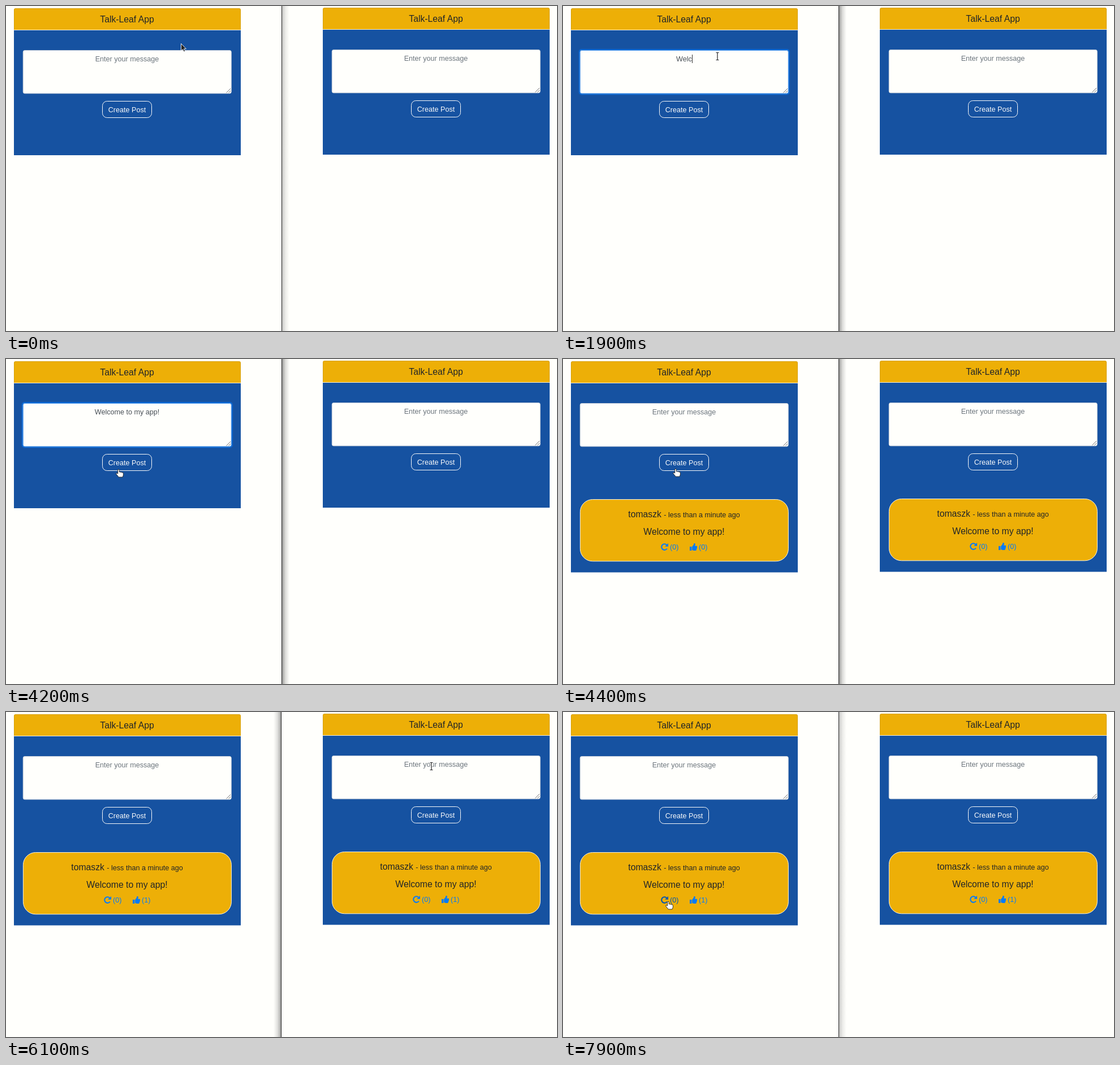
Recreate the animation shown at these times as an HTML page. Size 974 by 575 pixels, loop 8000 ms.

```html
<!DOCTYPE html>
<html lang="en">
<head>
<meta charset="utf-8">
<title>Two browser windows</title>
<style>
  html, body { margin: 0; width: 100%; height: 100%; overflow: hidden; background: #fffffc; }
  svg { display: block; width: 974px; height: 575px; }
  text { font: 12.6px "Liberation Sans", Arial, sans-serif; text-anchor: middle; white-space: pre; }
  .big { font-size: 15.75px; fill: #212529; }
  .small { font-size: 12.6px; }
  .link { fill: #007bff; color: #007bff; }
  .link text { text-anchor: start; }
  .hover { fill: #0056b3; color: #0056b3; }
</style>
</head>
<body>
<svg id="stage" viewBox="0 0 974 575"></svg>
<script>
const PAPER = '#fffffc', BLUE = '#1652a1', GOLD = '#edaf07';
const LOOP = 8000, STEP = 100;
const MESSAGE = 'Welcome to my app!';

const panel = (id, x, y) => `
<g id="${id}" transform="translate(${x} ${y})">
  <path d="M14 43V7q0-3 3-3H412q3 0 3 3V43Z" fill="${GOLD}"/>
  <path d="M14.4 43V7.4q0-3 3-3H411.6q3 0 3 3V43" fill="none" stroke="#000" stroke-opacity=".13" stroke-width=".8"/>
  <rect class="body" x="14" y="43" width="401" height="221" fill="${BLUE}"/>
  <rect x="14" y="42" width="401" height="1" fill="#f3efe0"/>
  <text class="big" x="214" y="29">Talk-Leaf App</text>
  <rect class="glow" x="27.7" y="76" width="373.1" height="81.3" rx="5" fill="#007bff" fill-opacity=".5" opacity="0"/>
  <rect x="30.2" y="78.5" width="368.1" height="76.3" rx="3" fill="${PAPER}" stroke="#ced4da" stroke-width=".8"/>
  <rect class="glow" x="30.2" y="78.5" width="368.1" height="76.3" rx="3" fill="none" stroke="#4a98ee" opacity="0"/>
  <path d="M389.5 153.5l7.5-7.5M393.5 153.5l3.5-3.5" stroke="#666" stroke-width=".9"/>
  <text class="field" x="214" y="98"></text>
  <rect class="caret" y="86" width="1" height="15" fill="#333" visibility="hidden"/>
  <rect x="170.5" y="168.5" width="87" height="29" rx="8" fill="none" stroke="#f8f9fa"/>
  <text x="214" y="187.5" fill="#f8f9fa">Create Post</text>
  <g class="post" visibility="hidden">
    <rect x="30.4" y="248.5" width="368" height="109.3" rx="22" fill="${GOLD}" stroke="#fbf4dd"/>
    <text class="big" x="214" y="280">tomaszk <tspan class="small">- less than a minute ago</tspan></text>
    <text class="big" x="214" y="310.5">${MESSAGE}</text>
    <g class="link redo">
      <path d="M183.6 329.2A5.3 5.3 0 1 0 183.9 335.5" fill="none" stroke="currentColor" stroke-width="2.1"/>
      <path d="M186 326v5.7h-5.8z"/>
      <text x="189" y="337">(0)</text>
    </g>
    <g class="link like">
      <path d="M224 332h3.4v7H224zM228.2 332.2l2.6-3.5c.6-.9.2-2.6 1.4-2.6 2.2 0 2 2.6.8 4.6h2.8c1.5 0 1.8 1.5.9 2.3.6.8.4 1.5-.3 2 .4.9 0 1.6-.6 1.9.2 1.2-.5 2.1-1.7 2.1h-2c-1.7 0-2.4-.7-3.9-1z"/>
      <text class="count" x="240" y="337">(0)</text>
    </g>
  </g>
</g>`;

const fade = (id, from, to, alpha) => `
<linearGradient id="${id}" x1="${from}" x2="${to}">
  <stop offset="0" stop-color="#333" stop-opacity="${alpha}"/>
  <stop offset=".45" stop-color="#333" stop-opacity="${alpha * .35}"/>
  <stop offset="1" stop-color="#333" stop-opacity="0"/>
</linearGradient>`;

const stage = document.getElementById('stage');
stage.innerHTML = `
<defs>${fade('soft', 0, 1, .28)}${fade('strong', 0, 1, .5)}${fade('back', 1, 0, .45)}</defs>
<rect width="974" height="575" fill="${PAPER}"/>
${panel('left', 0, 0)}${panel('right', 546, -1)}
<rect id="shade" width="13" height="575"/>
<rect id="edge" width="1" height="575" fill="#222"/>
<g id="pointer" stroke-linejoin="round">
  <path class="arrow" d="M.5 .5V13.3L3.4 10.6 5.5 15.1 7.6 14.1 5.6 9.8H9.4Z" fill="#222" stroke="#fff" stroke-width=".9"/>
  <g class="beam" fill="none">
    <path d="M-2.5-6.5H2.5M0-6.5V6.5M-2.5 6.5H2.5" stroke="#fff" stroke-width="2.6"/>
    <path d="M-2.5-6.5H2.5M0-6.5V6.5M-2.5 6.5H2.5" stroke="#222" stroke-width="1.2"/>
  </g>
  <path class="hand" d="M-1.3 8V1Q0-.7 1.3 1V5Q2.6 4.2 3.5 5.4 4.7 4.6 5.8 5.8 8.2 5.3 8.4 7.4V10Q8.2 12 7 14H.2Q-1.6 11.5-4.2 8.6-4.6 6.6-2.7 7Z" fill="#fff" stroke="#222" stroke-width=".9"/>
</g>`;

const $ = s => stage.querySelector(s);
const show = (el, on) => el.setAttribute('visibility', on ? 'visible' : 'hidden');
const lastBefore = (rows, t) => rows.filter(r => r[0] <= t).pop();

// [time, x, y, shape]
const MOVES = [
  [0, 309, 66, 'arrow'], [300, 297, 73, 'arrow'], [400, 283, 83, 'beam'], [600, 270, 76, 'beam'],
  [900, 273, 89, 'beam'], [3800, 232, 150, 'arrow'], [3900, 187, 173, 'hand'], [4100, 199, 195, 'hand'],
  [4300, 199, 194, 'hand'], [4500, 240, 206, 'arrow'], [4600, 390, 243, 'arrow'], [4700, 580, 290, 'arrow'],
  [4800, 745, 330, 'arrow'], [4900, 842, 339, 'arrow'], [5000, 826, 338, 'arrow'], [5100, 811, 335, 'arrow'],
  [5200, 802, 333, 'arrow'], [5300, 795, 331, 'hand'], [5800, 798, 280, 'arrow'], [5900, 794, 213, 'arrow'],
  [6100, 752, 96, 'beam'], [6300, 715, 108, 'beam'], [6400, 679, 121, 'beam'], [6600, 480, 215, 'arrow'],
  [6700, 260, 304, 'arrow'], [6800, 176, 324, 'hand'], [7000, 163, 345, 'arrow'], [7100, 172, 356, 'arrow'],
  [7200, 212, 354, 'arrow'], [7300, 256, 346, 'arrow'], [7400, 279, 322, 'arrow'], [7500, 266, 285, 'arrow'],
  [7600, 232, 300, 'arrow'], [7700, 201, 324, 'hand'], [7800, 186, 335, 'hand']
];

// [time, letters typed]
const KEYS = [
  [0, 0], [1400, 1], [1600, 2], [1800, 3], [1900, 4], [2100, 5], [2200, 6], [2300, 7], [2400, 8],
  [2500, 10], [2600, 11], [2800, 13], [2900, 14], [3000, 15], [3100, 16], [3300, 17], [3400, 18], [4400, 0]
];

// [time, shadow, shadow x, edge x]
const FOCUS = [
  [0, 'soft', 488, 487], [600, 'strong', 488, 487], [5500, 'back', 473, 486], [7900, 'soft', 488, 487]
];

function drawField(id, typed) {
  const field = $(`#${id} .field`);
  field.textContent = typed || 'Enter your message';
  field.setAttribute('fill', typed ? '#495057' : '#6c757d');
  return typed ? field.getComputedTextLength() : 0;
}

function drawPost(id, posted, liked) {
  show($(`#${id} .post`), posted);
  $(`#${id} .body`).setAttribute('height', posted ? 334.5 : 221);
  $(`#${id} .count`).textContent = liked ? '(1)' : '(0)';
}

function drawPointer(t) {
  const [, x, y, shape] = lastBefore(MOVES, t);
  $('#pointer').setAttribute('transform', `translate(${x} ${y})`);
  for (const kind of ['arrow', 'beam', 'hand']) show($(`#pointer .${kind}`), kind === shape);
}

function drawFocus(t) {
  const [, shadow, shadeX, edgeX] = lastBefore(FOCUS, t);
  $('#shade').setAttribute('fill', `url(#${shadow})`);
  $('#shade').setAttribute('x', shadeX);
  $('#edge').setAttribute('x', edgeX);
}

function draw(t) {
  const width = drawField('left', MESSAGE.slice(0, lastBefore(KEYS, t)[1]));
  drawField('right', '');

  const caret = $('#left .caret');
  caret.setAttribute('x', Math.round(213.7 + width / 2));
  show(caret, t >= 900 && t < 4100);

  const glow = t < 4300 ? Math.min(1, Math.max(0, (t - 800) / 300)) : 0;
  stage.querySelectorAll('#left .glow').forEach(el => el.setAttribute('opacity', glow));

  drawPost('left', t >= 4400, t >= 5800);
  drawPost('right', t >= 4400, t >= 5500);
  $('#right .like').classList.toggle('hover', t >= 5300 && t < 5800);
  $('#left .redo').classList.toggle('hover', t >= 7700 || (t >= 6800 && t < 7000));
  drawPointer(t);
  drawFocus(t);
}

const start = performance.now();
let drawn = -1;
function tick() {
  const t = Math.floor((performance.now() - start) % LOOP / STEP) * STEP;
  if (t !== drawn) draw(drawn = t);
  requestAnimationFrame(tick);
}
tick();
</script>
</body>
</html>
```
